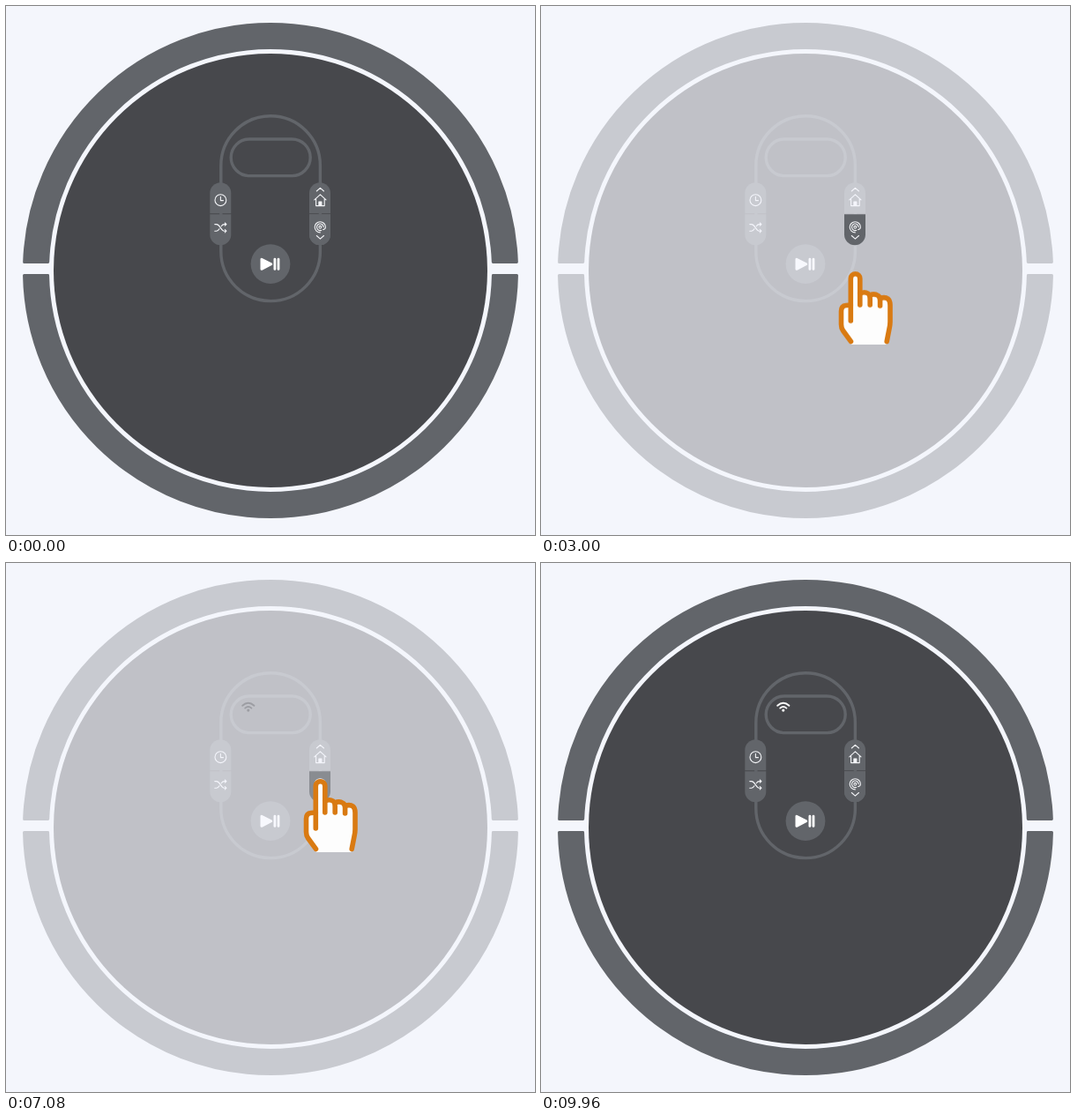
Animation of 600x600 px, one loop 10 s. Source, as an HTML page:

```html
<!DOCTYPE html>
<html lang="en">
<head>
<meta charset="utf-8">
<title>Robot vacuum: connecting to the network</title>
<style>
  html, body { margin: 0; width: 100%; height: 100%; overflow: hidden; background: #f4f6fc; }
  svg { display: block; width: 100vw; height: 100vh; }
  .grey { fill: #62656a; }
  .rim { fill: #62656a; stroke: #62656a; stroke-width: 3; stroke-linejoin: round; }
  .frame { fill: none; stroke: #62656a; stroke-width: 3.4; }
  .icon { fill: none; stroke: #f4f5f8; stroke-width: 1.1; stroke-linecap: round; stroke-linejoin: round; }
  .solid { fill: #fff; stroke: #fff; stroke-width: 2.8; stroke-linecap: round; stroke-linejoin: round; }
  .line { fill: none; stroke: #d97a12; stroke-width: 5.6; stroke-linecap: round; stroke-linejoin: round; }
  #dark, #light { opacity: 0; }
  #dark { color: #5b5c60; }
  #light { color: #fff; }
  #hand { opacity: 0; }
</style>
</head>
<body>
<svg viewBox="0 0 600 600">
  <defs>
    <path id="cap" d="M0 35V12a12 12 0 0 1 24 0V35Z"/>
    <g id="spot">
      <use href="#cap" class="grey" transform="translate(344 271.3) scale(1 -1)"/>
      <g class="icon">
        <circle cx="356.3" cy="250.8" r="1.4"/>
        <path d="M357.6 254.4A3.8 3.8 0 1 1 360.1 250.8"/>
        <path d="M356.3 256.9A6.1 6.1 0 1 1 362.4 250.8Q362.2 253.6 359.6 253.6"/>
        <path d="M352.3 260.5l4.1 3.6l4.1-3.6"/>
      </g>
    </g>
    <g id="wifi">
      <g fill="none" stroke="currentColor" stroke-width="1.9" stroke-linecap="round">
        <path d="M268.2 161.8Q274.8 155.6 281.4 161.8"/>
        <path d="M271.2 164.6Q274.8 161.4 278.4 164.6"/>
      </g>
      <circle cx="274.8" cy="167.1" r="1.6" fill="currentColor"/>
    </g>
    <clipPath id="cuff"><path d="M330 230H410V327.3H330Z"/></clipPath>
  </defs>

  <g id="robot">
    <path class="rim" d="M20.66 290.5A279.5 279.5 0 0 1 300 20.5A279.5 279.5 0 0 1 579.34 290.5H552.32A252.5 252.5 0 0 0 300 47.5A252.5 252.5 0 0 0 47.68 290.5Z"/>
    <path class="rim" d="M20.55 305.5A279.5 279.5 0 0 0 300 579.5A279.5 279.5 0 0 0 579.45 305.5H552.44A252.5 252.5 0 0 1 300 552.5A252.5 252.5 0 0 1 47.56 305.5Z"/>
    <circle cx="300" cy="300" r="246" fill="#47484c"/>

    <rect class="frame" x="243.8" y="124.8" width="112.6" height="209.8" rx="56.3"/>
    <rect class="frame" x="255.2" y="151" width="90" height="41.6" rx="20.8"/>

    <use href="#cap" class="grey" x="231.3" y="200.2"/>
    <use href="#cap" class="grey" transform="translate(231.3 271.3) scale(1 -1)"/>
    <use href="#cap" class="grey" x="344" y="200.2"/>
    <use href="#spot"/>

    <g class="icon">
      <circle cx="243.4" cy="220.2" r="6.4"/>
      <path d="M243.4 216.4V220.6H246.4"/>
      <path d="M236.8 247.6H238.8C243 247.6 243.4 255.2 247.6 255.2H249.6"/>
      <path d="M236.8 255.2H238.8C240.4 255.2 241.2 254.2 242 252.8M244.2 249.8C245 248.6 245.8 247.6 247.6 247.6H249.6"/>
      <path d="M248.3 246l1.6 1.6l-1.6 1.6M248.3 253.6l1.6 1.6l-1.6 1.6"/>
      <path d="M352.3 210l4.1-3.6l4.1 3.6"/>
      <path d="M349.8 219.8L356.4 213.8L363 219.8M351.6 219V226.6H361.2V219"/>
      <path d="M354.9 226V222H357.9V226Z" fill="#f4f5f8"/>
    </g>

    <circle class="grey" cx="300" cy="292.6" r="22.4"/>
    <g class="solid">
      <path d="M289.9 287.2V298.4L300.8 292.8Z"/>
      <path d="M304.9 287.2V298.4M309 287.2V298.4"/>
    </g>
    <use id="light" href="#wifi"/>
  </g>

  <use id="hot" href="#spot"/>
  <use id="dark" href="#wifi"/>

  <g id="hand">
    <g clip-path="url(#cuff)">
      <path fill="#fdfdfd" d="M352 328L342.5 312Q340.5 309 340.5 305V290Q340.5 284 346 283.5L351.3 283V253a5.25 5.25 0 0 1 10.5 0V270Q367 267.5 371 270L373.2 272Q378 269.5 382.5 272.5L384.6 275.5Q390 273.5 393.5 276Q396 278 396 283V302Q396 306 395 310L391.5 328Z"/>
      <g class="line">
        <path d="M351.5 324.4L342.5 312Q340.5 309 340.5 305V290Q340.5 284 346 283.5L351.3 283"/>
        <path d="M351.3 301V253a5.25 5.25 0 0 1 10.5 0V283"/>
        <path d="M361.8 270Q367 267.5 371 270Q373.2 271.5 373.2 276V283"/>
        <path d="M373.2 272Q378 269.5 382.5 272.5Q384.6 274 384.6 278V284"/>
        <path d="M384.6 275.5Q390 273.5 393.5 276Q396 278 396 283V302Q396 306 395 310L392.2 324.4"/>
      </g>
    </g>
  </g>
</svg>
<script>
  const LOOP = 10000;
  const SMOOTH = 'cubic-bezier(.333,0,.667,1)';
  const REACH = 'cubic-bezier(.33,0,.15,1)';

  // steps: [time in ms, value, easing towards the next step]
  function play(id, prop, steps) {
    const frames = steps.map(([t, value, easing = SMOOTH]) =>
      ({ offset: t / LOOP, [prop]: value, easing }));
    document.getElementById(id).animate(frames, { duration: LOOP, iterations: Infinity });
  }

  const shift = y => `translate(0px, ${y}px)`;

  play('robot', 'opacity', [[0, 1], [1040, 1], [1980, .3], [7440, .3], [7950, 1], [LOOP, 1]]);
  play('hand', 'opacity', [[0, 0], [1040, 0], [1980, 1], [7440, 1], [7950, 0], [LOOP, 0]]);
  play('hand', 'transform', [
    [0, shift(216)], [2600, shift(216), REACH], [3520, shift(0)],
    [7440, shift(0)], [7950, shift(216)], [LOOP, shift(216)]
  ]);
  play('hot', 'opacity', [[0, 1], [3200, 1], [3560, .61], [7440, .61], [7640, 1], [LOOP, 1]]);

  // the network symbol pulses every 800 ms, dark first and then white
  play('dark', 'opacity', [
    [0, 0], [6000, 0], [6000, 1], [6440, 0], [6840, 1], [7240, 0], [7640, 1], [8040, 0], [LOOP, 0]
  ]);
  play('light', 'opacity', [
    [0, 0], [8040, 0], [8440, 1], [8840, 0], [9240, 1], [9640, 0], [LOOP, 1]
  ]);
</script>
</body>
</html>
```
